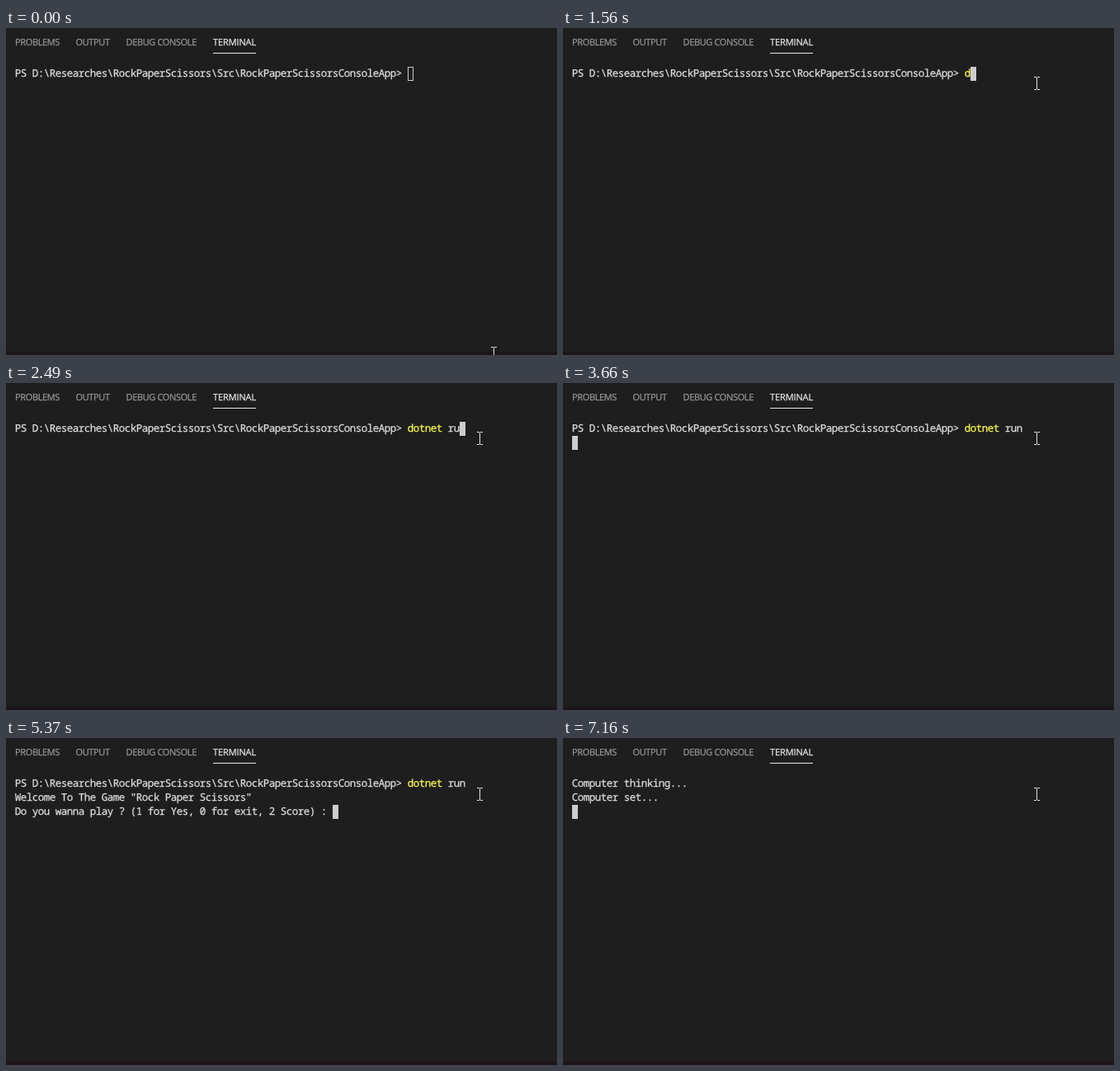
An HTML page for the animation above (8 s loop, 668 by 396 pixels).

```html
<!DOCTYPE html>
<html lang="en">
<head>
<meta charset="utf-8">
<title>Terminal session</title>
<style>
  html, body { margin: 0; width: 100%; height: 100%; overflow: hidden; background: #1e1e1e; }
  svg { display: block; width: 668px; height: 396px; }
  text { white-space: pre; text-rendering: geometricPrecision; }
  text, tspan { fill: currentColor; stroke: currentColor; stroke-width: 0.25px; }
  .tab { font: 11px "Open Sans", "Noto Sans", sans-serif; letter-spacing: -0.36px; color: #979797; }
  .active { color: #e7e7e7; letter-spacing: -0.12px; }
  /* 0.6em glyphs set on a 7px cell */
  .line { font: 12.5px "Noto Sans Mono", "DejaVu Sans Mono", monospace; letter-spacing: -0.5px; color: #e0e0e0; }
</style>
</head>
<body>
<svg viewBox="0 0 668 396">
  <rect width="668" height="396" fill="#1e1e1e"/>
  <rect y="392" width="668" height="4" fill="#1c1519"/>
  <text class="tab" x="11" y="21">PROBLEMS</text>
  <text class="tab" x="84.5" y="21">OUTPUT</text>
  <text class="tab" x="145.5" y="21">DEBUG CONSOLE</text>
  <text class="tab active" x="251" y="21">TERMINAL</text>
  <rect x="251" y="30" width="52" height="1" fill="#e7e7e7"/>
  <g id="lines"></g>
  <rect id="caret" stroke="#cccccc" width="6" height="16"/>
  <path id="mouse" fill="#e6e6e6" d="M0 0h3v1h-3zM4 0h3v1h-3zM3 1h1v14h-1zM0 15h3v1h-3zM4 15h3v1h-3z"/>
</svg>
<script>
const LOOP = 8000, LEFT = 11, TOP = 47, CELL = 7, ROW = 17;
const YELLOW = "#ffff40", GREEN = "#23d18b", RED = "#f14c4c";
const PATH = "PS D:\\Researches\\RockPaperScissors\\Src\\RockPaperScissorsConsoleApp";
const WELCOME = 'Welcome To The Game "Rock Paper Scissors"';
const QUESTION = "Do you wanna play ? (1 for Yes, 0 for exit, 2 Score) : ";

// The prompt mark turns red while the input is an unfinished keyword.
function prompt(input) {
  const keyword = input === "do";
  return [
    [PATH], [">", keyword ? RED : ""], [" "],
    [input.slice(0, 6), keyword ? GREEN : YELLOW], [input.slice(6)]
  ];
}

const ran = prompt("dotnet run");
const screens = [
  ...[
    [0, ""], [1560, "d"], [1710, "do"], [1790, "dot"], [1940, "dotn"],
    [2090, "dotne"], [2180, "dotnet"], [2330, "dotnet "], [2410, "dotnet r"],
    [2490, "dotnet ru"], [2640, "dotnet run"], [2790, "dotnet run "], [3190, "dotnet run"]
  ].map(([at, input]) => [at, [prompt(input)]]),
  [3660, [ran, []]],
  [4830, [ran, [[WELCOME]], []]],
  [4900, [ran, [[WELCOME]], [[QUESTION]]]],
  [6700, [ran, [[WELCOME]], [[QUESTION + "1"]]]],
  [7080, [ran, [[WELCOME]], [[QUESTION + "1"]], []]],
  [7160, [[["Computer thinking..."]], [["Computer set..."]], []]]
];

const $ = id => document.getElementById(id);
const setAttrs = (node, attrs) => {
  for (const key in attrs) node.setAttribute(key, attrs[key]);
  return node;
};
const svgNode = (name, attrs) =>
  setAttrs(document.createElementNS("http://www.w3.org/2000/svg", name), attrs);

function showLines(lines) {
  $("lines").replaceChildren(...lines.map((spans, row) => {
    const text = svgNode("text", { class: "line", x: LEFT - 0.25, y: TOP + 12 + row * ROW });
    for (const [string, color] of spans) {
      const span = svgNode("tspan", color ? { color } : {});
      span.textContent = string;
      text.append(span);
    }
    return text;
  }));
  const row = lines.length - 1;
  const column = lines[row].reduce((sum, [string]) => sum + string.length, 0);
  setAttrs($("caret"), { x: LEFT + column * CELL + 0.5, y: TOP + row * ROW + 0.5 });
}

// Centre of the pointer: a stepped arc up, a nudge on the click, then a small drift.
function mouseAt(t) {
  if (t >= 5370) return [574, 68];
  if (t >= 850 && t < 930) return [580, 69];
  const step = t < 70 ? 0 : Math.min(8, Math.floor((t - 70) / (540 / 7) + 1e-6) + 1);
  const u = step / 8, s = u * u * (3 - 2 * u);
  const bend = (a, b, c) => Math.round(a * (1 - s) ** 2 + 2 * b * s * (1 - s) + c * s * s);
  return [bend(591, 620, 574), bend(394, 230, 67)];
}

let shown = null;
function draw(t) {
  const screen = screens.findLast(([at]) => t >= at);
  if (screen !== shown) {
    shown = screen;
    showLines(screen[1]);
  }
  $("caret").setAttribute("fill", t < 850 ? "none" : "#cccccc");
  const [x, y] = mouseAt(t);
  $("mouse").setAttribute("transform", `translate(${x - 3} ${y - 8})`);
}

const start = performance.now();
function tick() {
  draw((performance.now() - start) % LOOP);
  requestAnimationFrame(tick);
}
tick();
</script>
</body>
</html>
```
